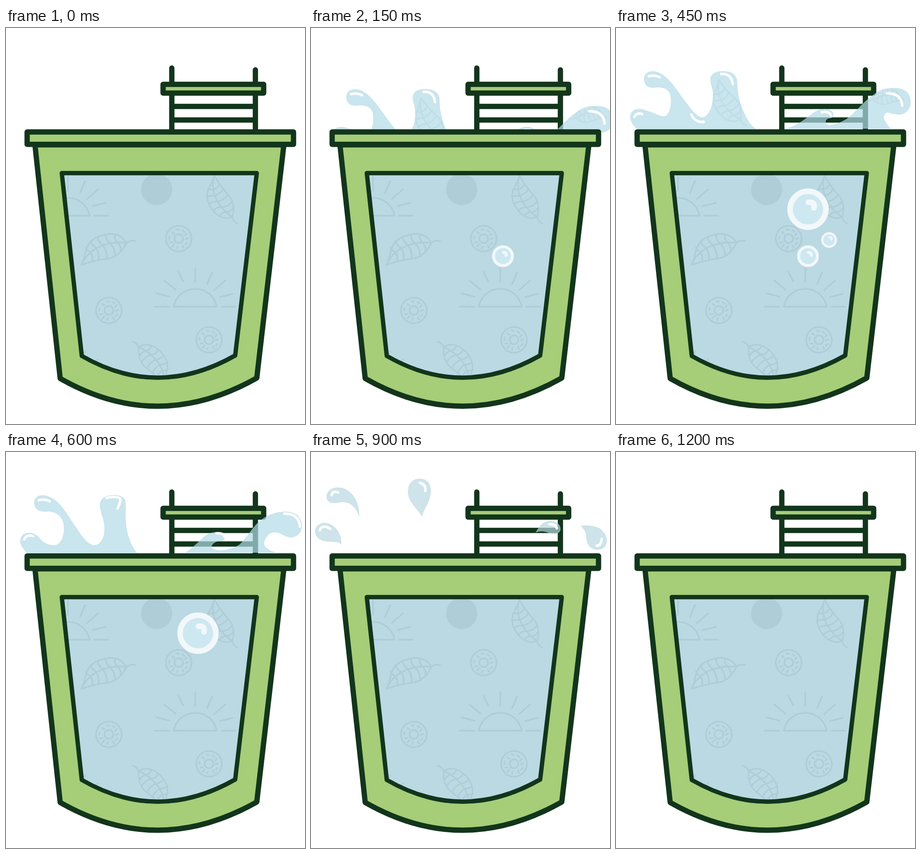
Recreate the animation shown at these times as an HTML page. Size 651 by 861 pixels, loop 1350 ms.

```html
<!DOCTYPE html>
<html lang="en">
<head>
<meta charset="utf-8">
<title>Splash pool</title>
<style>
  html, body { margin: 0; width: 100%; height: 100%; overflow: hidden; background: #fff; }
  svg { display: block; width: 100%; height: 100%; }
  path, line, circle { stroke-linecap: round; stroke-linejoin: round; }
  .ink { stroke: #12351b; stroke-width: 11.5; stroke-linejoin: round; fill: none; }
  .green { fill: #a6cd78; }
  .pattern { fill: none; stroke: #afcdd7; stroke-width: 3.6; }
  .water { fill: #b2dae7; fill-opacity: .7; }
  .early .water { fill: #aed4de; }
  .late .water { fill: #bad8e2; }
  .shine { fill: none; stroke: #fff; stroke-width: 5.5; }
  .early .shine { stroke: #eff4f7; }
  .texture { opacity: .35; }

  /* --at is the first 150 ms slot, the class gives the number of slots */
  .one, .two, .three {
    visibility: hidden;
    animation: one 1350ms step-end infinite;
    animation-delay: calc(var(--at) * 150ms - 1350ms);
  }
  .two { animation-name: two; }
  .three { animation-name: three; }
  @keyframes one { 0% { visibility: visible } 11.111%, 100% { visibility: hidden } }
  @keyframes two { 0% { visibility: visible } 22.222%, 100% { visibility: hidden } }
  @keyframes three { 0% { visibility: visible } 33.333%, 100% { visibility: hidden } }
</style>
</head>
<body>
<svg viewBox="0 0 651 861" preserveAspectRatio="none">
  <defs>
    <path id="window" d="M121.5 315.5H546L499 712Q330 808 165 713Z"/>
    <clipPath id="pane"><use href="#window"/></clipPath>

    <g id="sun">
      <path d="M-88 0H-57M57 0H87M-47 0H47C42-24 22-39 0-39S-42-24-47 0"/>
      <path d="M0-84V-54M37-75L26-49M65-57L41-36M82-28L54-21M-37-76L-26-55M-67-57L-43-37M-84-29L-56-22"/>
    </g>
    <g id="slice">
      <circle r="28"/><circle r="9.5"/>
      <path d="M-20-5l-1 5M-14-14l4 3M-5-20l5 1M8-18l4 3M17-11l-3 4M20-1l-5 2M18 9l-3 4M9 15l2 5M-2 17l-2 4M-10 13l-4 4M-19 8l5 0"/>
    </g>
    <g id="leaf">
      <path d="M0 0C8-6 14-5 19-4C22-38 62-44 82-40C108-34 112-10 128 0C105 2 85 6 70 11C50 16 32 8 19-4C50-22 95-30 128 0"/>
      <path d="M36-12q4-8 0-16M52-18q5-9 1-19M68-21q6-9 3-20M84-22q6-7 5-17M99-18q5-5 5-12"/>
      <path d="M36-12q-4 10 2 20M52-18q-6 14 1 31M68-21q-4 16 4 31M84-22q-3 14 5 27M99-18q-2 11 4 20"/>
    </g>
    <g id="bubble">
      <circle r="39" fill="#cde8f1" stroke="#f2f8fa" stroke-width="12"/>
      <path d="M1-15C12-17 15-10 13-3" fill="none" stroke="#f2f8fa" stroke-width="12"/>
    </g>

    <g id="wave">
      <path class="water" data-shape="full"/>
      <g class="pattern texture">
        <use href="#leaf" transform="translate(283 212) rotate(239) scale(.9)"/>
        <use href="#leaf" transform="translate(548 160) rotate(-3) scale(.62)"/>
      </g>
      <path class="shine" d="M71 105q12-4 24 2M40 193q5-10 17-6M164 188q8 18 27 16M229 100q22-2 25 22M448 183q18-3 20 8M590 142q32 0 33 27"/>
    </g>
    <path id="thinShine" class="shine" d="M71 105q12-4 24 2M40 190q5-12 19-7M219 100C230 97 249 96 249 104C249 112 245 116 243 123M458 177q16-2 18 8M606 134q32 0 34 28"/>
  </defs>

  <g class="ink">
    <path d="M361 87V225M543 91V225M361 170.500H543M361 200H543"/>
    <rect class="green" x="342" y="122.500" width="219" height="19"/>
  </g>

  <g class="one early" style="--at:1"><use href="#wave" x="16" y="39"/></g>
  <g class="one early" style="--at:2"><use href="#wave" x="8" y="14"/></g>
  <g class="one" style="--at:3"><use href="#wave"/></g>
  <g class="one" style="--at:4">
    <path class="water" data-shape="middle"/>
    <use href="#thinShine"/>
  </g>
  <g class="one late" style="--at:5">
    <path class="water" data-shape="thin"/>
    <use href="#thinShine"/>
  </g>
  <g class="two late" style="--at:6">
    <path class="water" d="M34 100C32 85 45 76 62 77C90 80 107 110 105 142C100 122 85 106 65 109C50 113 36 112 34 100Z"/>
    <path class="water" d="M242 141C230 120 211 110 211 86C211 68 222 58 237 58C253 58 262 70 261 86C261 108 246 120 242 141Z"/>
    <path class="water" d="M66 203C64 195 55 196 40 195C20 195 9 185 9 172C9 160 20 153 32 154C55 158 68 180 66 203Z"/>
    <path class="water" d="M489 175C498 160 505 150 520 150C537 150 545 160 543 170C540 180 527 180 518 176C508 172 500 171 489 175Z"/>
    <path class="water" d="M587 160C600 160 615 158 630 167C643 178 647 190 642 203C636 214 618 216 608 207C595 195 603 180 595 170Z"/>
    <path class="shine" d="M45 94Q47 83 59 88M237 67q14 4 12 18M19 170q6-14 23-3M519 157q14-1 16 9M633 189q-1 14-11 15"/>
  </g>

  <path class="ink green" d="M63 254L118 762Q330 883 546 761L605 254Z"/>
  <rect class="ink green" x="46" y="226" width="580" height="27"/>

  <use href="#window" fill="#bbd9e3"/>
  <g clip-path="url(#pane)">
    <g class="pattern">
      <use href="#sun" x="412" y="606"/>
      <use href="#sun" x="135" y="408"/>
      <use href="#sun" x="135" y="778"/>
      <use href="#slice" x="376" y="458"/>
      <use href="#slice" x="224" y="614"/>
      <use href="#slice" x="442" y="678"/>
      <use href="#leaf" transform="translate(281 463) rotate(156) scale(1 -1)"/>
      <use href="#leaf" transform="translate(503 425) rotate(244.600) scale(.9)"/>
      <use href="#leaf" transform="translate(276 682) rotate(54) scale(.9)"/>
    </g>
    <circle cx="328" cy="351" r="34" fill="#afcdd7"/>
    <g class="three" style="--at:1"><use href="#bubble" transform="translate(418 496) scale(.525)"/></g>
    <g class="two" style="--at:2"><use href="#bubble" transform="translate(464 461) scale(.38)"/></g>
    <g class="three" style="--at:3"><use href="#bubble" transform="translate(418 394)"/></g>
  </g>
  <use href="#window" class="ink" style="stroke-width:9.500"/>
</svg>
<script>
  // Both outlines have the same segments, so they can be blended.
  const full =
    'M46 220C35 210 31 202 31 194C31 180 42 175 52 176C62 177 71 181 80 184C90 188 97 192 104 192' +
    'C118 192 122 160 118 145C114 130 98 128 80 130C66 130 60 120 61 108C63 95 76 92 88 95' +
    'C115 102 135 140 155 165C170 185 180 196 190 194C204 190 212 165 211 145C211 130 203 118 206 107' +
    'C210 95 225 93 238 94C256 95 264 105 264 118C264 150 275 180 290 205C297 214 302 217 305 220Z' +
    'M368 219C395 213 415 195 430 184C445 174 460 173 470 181C476 188 474 194 468 196' +
    'C460 196 455 200 457 207C462 215 480 210 500 199C525 182 545 150 575 137C600 127 625 128 636 142' +
    'C646 158 643 180 625 187C615 190 607 187 600 186C595 184 590 183 587 185C581 192 583 199 588 205' +
    'C591 212 595 216 600 219Z';
  const thin =
    'M46 219C32 205 30 198 31 190C33 177 48 172 60 176C76 182 76 195 72 203C76 215 90 219 105 219' +
    'C130 217 138 195 136 175C134 145 115 128 95 129C75 131 62 125 61 110C63 95 78 92 90 96' +
    'C120 102 130 130 148 160C165 190 180 215 200 215C218 215 222 200 218 180C214 160 203 140 202 120' +
    'C203 100 220 93 236 93C250 93 257 97 256 107C254 125 237 145 237 165C237 185 245 205 256 219Z' +
    'M420 219C425 205 432 185 445 175C460 167 478 170 483 178C486 190 475 194 465 191' +
    'C448 189 435 203 433 210C450 220 500 222 520 205C530 190 525 170 548 148C575 128 605 122 630 128' +
    'C650 137 655 160 648 172C640 186 625 184 612 175C590 160 570 155 550 170C530 190 525 205 532 210' +
    'C545 217 560 217 570 219Z';

  function blend(from, to, amount) {
    const ends = to.match(/\d+/g);
    let i = 0;
    return from.replace(/\d+/g, n => +n + (ends[i++] - n) * amount);
  }

  const shapes = { full, middle: blend(full, thin, 0.4), thin };
  for (const path of document.querySelectorAll('[data-shape]')) {
    path.setAttribute('d', shapes[path.dataset.shape]);
  }
</script>
</body>
</html>
```
